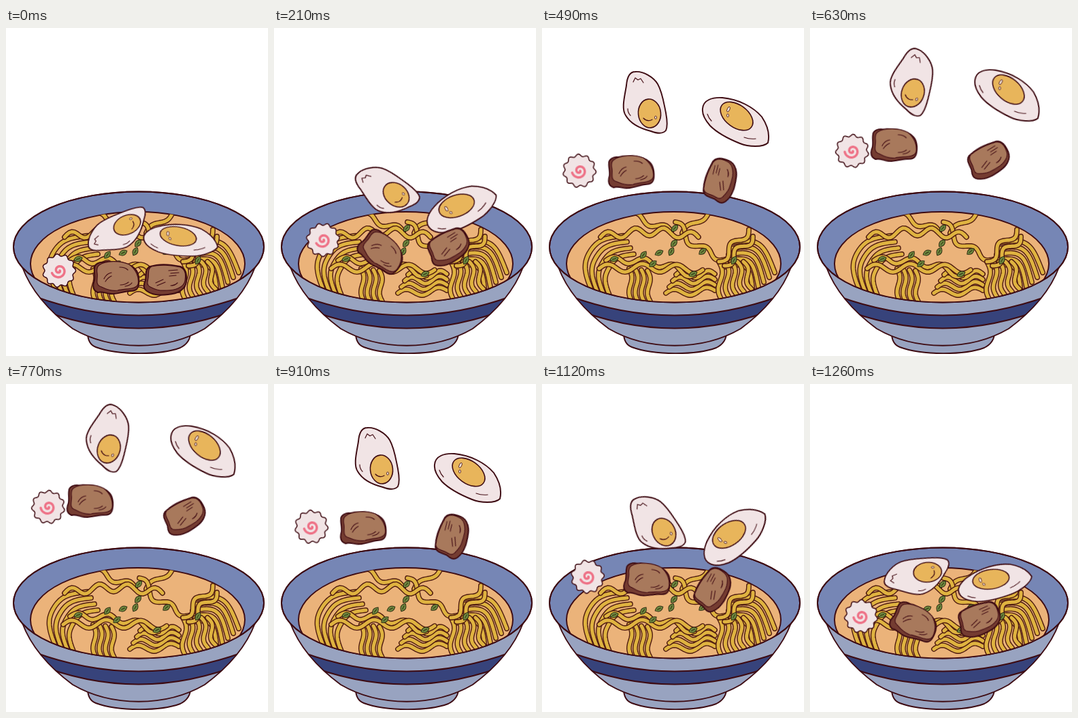
Animation, 385 px wide and 480 px high, one loop 1400 ms. Source, as an HTML page:

```html
<!DOCTYPE html>
<html lang="en">
<head>
<meta charset="utf-8">
<title>Ramen bowl</title>
<style>
html, body { margin: 0; width: 100%; height: 100%; overflow: hidden; background: #fff; }
svg { display: block; width: 100%; height: 100%; }
.line { fill: none; stroke: #430d14; stroke-width: 1.2; stroke-linecap: round; stroke-linejoin: round; }
.edge { stroke: #3d0b12; stroke-width: 1.9; stroke-linejoin: round; }
.white { fill: #f1e4e5; }
.yolk { fill: #e8b55b; stroke-width: 1.6; }
.shine { fill: #f6e7d8; stroke: #430d14; stroke-width: .8; }
.meat { fill: #a8795c; }
.side { fill: #743c31; }
.leaf { fill: #6f8a3f; stroke: #2d2a12; stroke-width: 1; }
.noodle { fill: none; stroke-linecap: round; stroke: #dfb340; stroke-width: 5; }
.noodle.rim { stroke: #4f1b10; stroke-width: 7.8; }
</style>
</head>
<body>
<svg viewBox="0 0 385 480">
  <defs>
    <ellipse id="rim" cx="195" cy="320.5" rx="184" ry="81"/>
    <path id="body" d="M24 350C36 382 60 412 98 440C155 473 235 473 292 440C330 412 354 382 366 350"/>
    <clipPath id="inRim"><use href="#rim"/></clipPath>
    <clipPath id="inSoup"><ellipse cx="193.5" cy="345" rx="157" ry="76" clip-path="url(#inRim)"/></clipPath>
    <clipPath id="inBody"><use href="#body"/></clipPath>
  </defs>
  <path class="edge" fill="#98a3c0" d="M120 446C120 458 124 464 132 467C165 479 226 479 256 468C266 463 271 456 271 446Z"/>
  <use href="#body" fill="#98a3c0"/>
  <path class="edge" clip-path="url(#inBody)" fill="#37437b" d="M40 392Q195 449 350 392V408Q195 471 40 408Z"/>
  <use href="#body" class="edge" fill="none"/>
  <use href="#rim" class="edge" fill="#7686b5"/>
  <ellipse class="edge" clip-path="url(#inRim)" cx="193.5" cy="345" rx="157.5" ry="76" fill="#ebb37a"/>
  <g id="noodles" clip-path="url(#inSoup)"></g>
  <use href="#rim" class="edge" fill="none"/>
  <g id="leaves"></g>
  <g id="egg1">
    <path class="edge white" d="M-15-46C-3-47 12-38 18-28C25-16 27 0 30 14C32 25 33 34 30 40C25 46 16 44 8 41C-8 37-22 30-29 18C-36 8-30-12-28-26C-27-38-23-46-15-46Z"/>
    <path class="line" d="M-18-31l3-6 4 3 4-2 4 6M-26 8q0 6 4 10"/>
    <ellipse class="edge yolk" cx="6" cy="15" rx="16.5" ry="21" transform="rotate(-6 6 15)"/>
    <path class="line" d="M-3 22Q3 28 10 24"/>
    <ellipse class="shine" cx="15" cy="21" rx="1.5" ry="2.2"/>
  </g>
  <g id="egg2">
    <path class="edge white" d="M-49-20C-48-33-34-37-20-36C4-34 26-22 38-8C46 4 50 18 47 30C40 37 18 36 6 31C-14 23-28 15-38 5C-46-4-50-12-49-20Z"/>
    <path class="line" d="M-42-12q2 6 6 10M12 22q8 3 17 2"/>
    <ellipse class="edge yolk" cx="1" cy="-9" rx="27" ry="16.5" transform="rotate(36 1 -9)"/>
    <ellipse class="shine" cx="-11" cy="-19" rx="1.8" ry="4" transform="rotate(25 -11 -19)"/>
    <ellipse class="shine" cx="-12" cy="-10" rx="1.5" ry="2.3"/>
  </g>
  <g id="meat1">
    <path class="edge side" d="M-32-14C-32-20-24-23-18-22C0-25 18-21 26-14C33-9 34 2 33 10C32 18 28 20 20 20C8 21 0 25-8 24C-16 23-22 20-27 22C-35 19-35 12-32 4C-31-4-33-8-32-14Z"/>
    <path class="line meat" d="M-25-18C-16-25 6-25 19-19C29-12 34 0 32 10C29 18 14 16 2 19C-10 21-18 15-24 13C-31 10-27 2-28-6C-29-12-28-16-25-18Z"/>
    <path class="line" d="M-18 2q4-8 11-9M-16 6q4-6 9-8M6 11q7 0 12-4M13 13q7-1 10-5M5-15q8 0 12 4"/>
  </g>
  <g id="meat2">
    <path class="edge side" d="M-22-20C-10-24 8-23 22-20C31-17 32-8 31 2C30 14 18 20 4 21C-10 23-20 21-27 16C-34 11-31 5-29 0C-28-8-30-17-22-20Z"/>
    <path class="line meat" d="M-20-20C-8-23 10-22 22-19C31-15 30-6 29 1C27 11 14 15 2 15C-10 16-16 13-22 10C-28 7-26 2-25-3C-24-10-26-17-20-20Z"/>
    <path class="line" d="M-14 4l11-5M-12 8l12-5M8 8q6 0 10-4M5-14l13-1M8-10l12-1M6-6l10-1"/>
  </g>
  <g id="naruto">
    <path id="frill" class="edge white" style="stroke-width:1.5"/>
    <path id="swirl" fill="none" stroke="#ee7287" stroke-width="3.4" stroke-linecap="round"/>
  </g>
</svg>
<script>
const $ = id => document.getElementById(id);

const curve = (n, point) => 'M' + Array.from({ length: n + 1 }, (_, i) =>
  point(i / n).map(v => v.toFixed(1)).join(' ')).join('L');

// A noodle from one end to the other, bowed sideways and rippling
function noodle(x0, y0, x1, y1, bow, ripple, turns) {
  const dx = x1 - x0, dy = y1 - y0, len = Math.hypot(dx, dy);
  const d = curve(40, u => {
    const off = bow * Math.sin(Math.PI * u) + ripple * Math.sin(2 * Math.PI * turns * u);
    return [x0 + dx * u + off * dy / len, y0 + dy * u - off * dx / len];
  });
  $('noodles').innerHTML += `<path class="noodle rim" d="${d}"/><path class="noodle" d="${d}"/>`;
}
const repeat = (n, draw) => { for (let i = 0; i < n; i++) draw(i); };

noodle(128, 272, 190, 298, 0, 5, 1.5);
noodle(245, 270, 206, 300, 0, 4, 1);
noodle(196, 284, 272, 338, -10, 6, 2);
repeat(4, i => noodle(72 + 9 * i, 382 + 3 * i, 120 + 5 * i, 304 + 9 * i, 32 - 3 * i, 2, 1.5));
noodle(86, 306, 230, 306, 8, 6, 3.5);
repeat(4, i => noodle(128 + 9 * i, 352 + i, 132 + 9 * i, 400, 0, 3, 1));
repeat(4, i => noodle(182 + 5 * i, 388 - 9 * i, 254, 384 - 8 * i, 0, 5, 1.5));
repeat(5, i => noodle(342 - 8 * i, 358 + 7 * i, 280 - 3 * i, 314 + 9 * i, -20, 2, 1));
repeat(5, i => noodle(260 + 9 * i, 342, 264 + 11 * i, 398 - 4 * i, 0, 4, 1));
repeat(2, i => noodle(304 + 6 * i, 295 + 10 * i, 260 + 8 * i, 342 + 6 * i, 0, 6, 1.5));
noodle(94, 340, 224, 362, 8, 5, 3);
noodle(84, 352, 236, 354, 2, 6, 3);

const leaves = [[106, 338], [149, 332], [163, 345], [172, 329], [190, 327],
  [194, 315], [236, 327], [222, 360], [282, 340], [195, 293]];
$('leaves').innerHTML = leaves.map(([x, y], i) =>
  `<path class="leaf" transform="translate(${x} ${y}) rotate(${-15 - i * 137 % 50})" d="M-6.5 0Q0-7.5 6.5 0Q0 7.5-6.5 0ZM-3 0H3"/>`).join('');

const polar = (span, radius) => curve(120, u => {
  const a = span * u, r = radius(a);
  return [r * Math.cos(a), r * Math.sin(a)];
});
$('frill').setAttribute('d', polar(2 * Math.PI, a => 22.8 + 1.7 * Math.cos(11 * a)) + 'Z');
$('swirl').setAttribute('d', polar(2.9 * Math.PI, a => 1 + 1.1 * a));

// Key poses (x, y, angle) on the way up, shared by all parts
const KEY_STEPS = [0, 1, 3, 4, 7, 9];
const poses = {
  egg1: [[164, 296, -97], [157, 279, -80], [165, 237, -42], [168, 205, -22], [152, 110, 0], [152, 79, 25]],
  egg2: [[256, 312, -24], [271, 292, -43], [275, 266, -55], [283, 224, -70], [285, 138, 0], [290, 99, 4]],
  meat1: [[162, 365, 0], [154, 349, 24], [159, 328, 38], [155, 286, 5], [131, 210, -3], [124, 171, 2]],
  meat2: [[234, 369, 0], [249, 345, -20], [257, 321, -28], [252, 301, -58], [263, 223, -72], [263, 194, -28]],
  naruto: [[78, 355, 0], [75, 340, 10], [72, 310, -8], [67, 282, -4], [55, 209, 4], [62, 180, 12]]
};
// The eggs lie flatter across their long axis near the soup
const longAxis = { egg1: 62, egg2: 32 };

function poseAt(keys, k) {
  let j = 1;
  while (j < keys.length - 1 && KEY_STEPS[j] < k) j++;
  const u = (k - KEY_STEPS[j - 1]) / (KEY_STEPS[j] - KEY_STEPS[j - 1]);
  return keys[j].map((v, i) => keys[j - 1][i] + (v - keys[j - 1][i]) * u);
}

// Rise for ten steps, fall back the same way; the second pose is held
const STEPS = 20;
for (const [id, keys] of Object.entries(poses)) {
  const axis = longAxis[id] || 0;
  const frames = Array.from({ length: STEPS + 1 }, (_, s) => {
    const up = Math.min(s, STEPS - s), k = up === 2 ? 1 : up;
    const [x, y, a] = poseAt(keys, k);
    const flat = axis ? 1 - 0.18 * Math.max(0, 1 - k / 4) : 1;
    return {
      offset: s / STEPS,
      easing: 'steps(1, end)',
      transform: `translate(${x}px, ${y}px) rotate(${a + axis}deg) scale(1, ${flat}) rotate(${-axis}deg)`
    };
  });
  $(id).animate(frames, { duration: 1400, iterations: Infinity });
}
</script>
</body>
</html>
```
